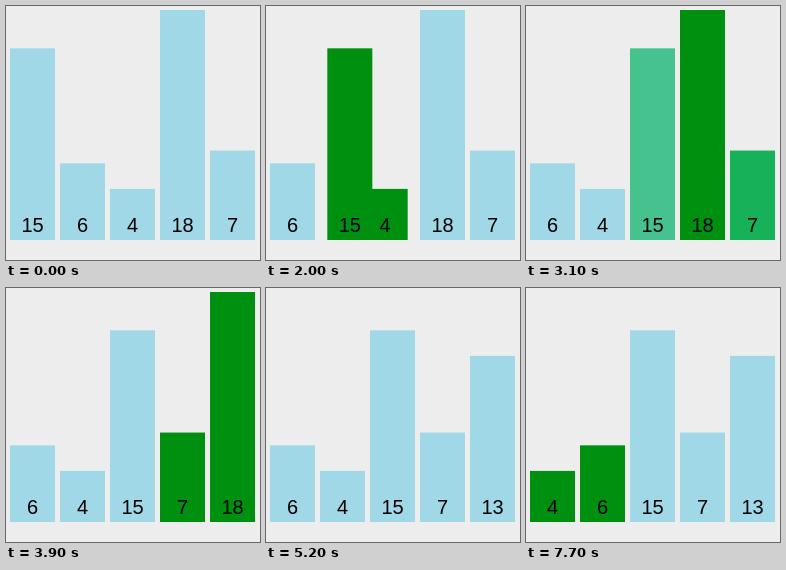
An HTML page with a canvas for the animation above (8000 ms loop, 254 by 254 pixels).

```html
<!DOCTYPE html>
<html lang="en">
<head>
<meta charset="utf-8">
<title>Bubble sort</title>
<style>
  html, body { margin: 0; width: 100%; height: 100%; overflow: hidden; background: #ededed; }
  canvas { display: block; }
</style>
</head>
<body>
<canvas id="stage" width="254" height="254"></canvas>
<script>
const ctx = document.getElementById('stage').getContext('2d');
const LOOP = 8000, STEP = 100;
const PITCH = 50, LEFT = 4, WIDTH = 45, BASE = 234, UNIT = 230 / 18;
const VALUES = [15, 6, 4, 18, 7, 13];

// Highlight ramp from idle blue to active green: [position, r, g, b]
const RAMP = [
  [0, 160, 216, 231],
  [0.16, 133, 209, 204],
  [0.25, 92, 203, 168],
  [0.75, 0, 168, 64],
  [1, 0, 144, 16]
];

const fade = (start, end, on, off = []) => ({ start, end, on, off });
const swap = (start, end, right, left) => ({ start, end, right, left });

const EVENTS = [
  fade(465, 680, [15, 6]),
  swap(840, 1180, 15, 6),
  fade(1365, 1680, [4], [6]),
  swap(1940, 2180, 15, 4),
  fade(2365, 2680, [18], [4]),
  fade(2965, 3180, [7], [15]),
  swap(3440, 3580, 18, 7),
  fade(3900, 4180, [13], [7]),
  swap(4440, 4580, 18, 13),
  fade(4865, 5180, [], [18, 13]),
  fade(6965, 7180, [6, 4]),
  swap(7440, 7680, 6, 4)
];

const swing = p => 0.5 - Math.cos(Math.PI * p) / 2;

function rampColor(level) {
  let i = 1;
  while (i < RAMP.length - 1 && level > RAMP[i][0]) i++;
  const a = RAMP[i - 1], b = RAMP[i];
  const k = (level - a[0]) / (b[0] - a[0]);
  const rgb = [1, 2, 3].map(c => Math.round(a[c] + (b[c] - a[c]) * k));
  return `rgb(${rgb})`;
}

function barsAt(time) {
  const bars = new Map(VALUES.map((v, slot) => [v, { slot, level: 0 }]));
  for (const e of EVENTS) {
    const p = Math.min(1, (time - e.start) / (e.end - e.start));
    if (p <= 0) break;
    if (e.on) {
      e.on.forEach(v => { bars.get(v).level = p; });
      e.off.forEach(v => { bars.get(v).level = 1 - p; });
    } else {
      bars.get(e.right).slot += swing(p);
      bars.get(e.left).slot -= swing(p);
    }
  }
  return bars;
}

function draw(time) {
  ctx.fillStyle = '#ededed';
  ctx.fillRect(0, 0, 254, 254);
  ctx.font = '20px "Liberation Sans", Arial, sans-serif';
  ctx.textAlign = 'center';
  for (const [value, { slot, level }] of barsAt(time)) {
    const x = LEFT + slot * PITCH, h = value * UNIT;
    ctx.fillStyle = rampColor(level);
    ctx.fillRect(x, BASE - h, WIDTH, h);
    ctx.fillStyle = '#000';
    ctx.fillText(value, x + WIDTH / 2, 226);
  }
}

// The picture advances ten times a second
const origin = performance.now();
function tick() {
  const time = (performance.now() - origin) % LOOP;
  draw(Math.floor(time / STEP) * STEP);
  requestAnimationFrame(tick);
}
tick();
</script>
</body>
</html>
```
